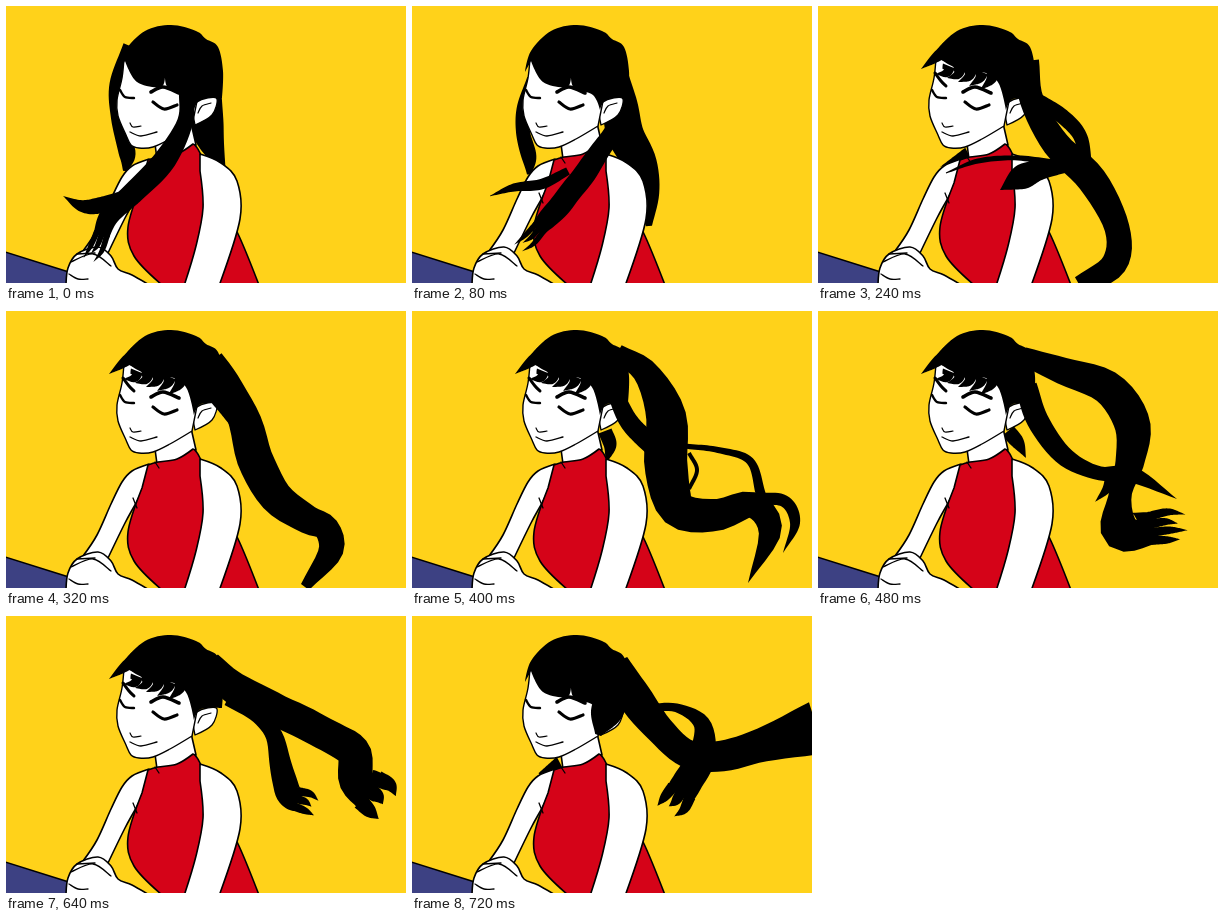
An HTML page with a canvas for the animation above (0.8 s loop, 400 by 277 pixels).

```html
<!DOCTYPE html>
<html lang="en">
<head>
<meta charset="utf-8">
<title>Hair in the wind</title>
<style>
html, body { margin: 0; width: 100%; height: 100%; overflow: hidden; background: #ffd21a; }
canvas { display: block; width: 400px; height: 277px; }
</style>
</head>
<body>
<canvas id="stage" width="400" height="277"></canvas>
<script>
const ctx = document.getElementById('stage').getContext('2d');
const YELLOW = '#ffd21a', RED = '#d50318', BLUE = '#3d4183', BLACK = '#000', WHITE = '#fff';
const STEP = 80, SAMPLES = 36;

const lerp = (a, b, t) => a + (b - a) * t;

// Catmull-Rom value at t (0..1) through a list of numbers.
function spline(values, t) {
  const last = values.length - 1, s = t * last, i = Math.min(last - 1, Math.floor(s)), f = s - i;
  const b = values[i], c = values[i + 1];
  const a = values[i - 1] ?? 2 * b - c, d = values[i + 2] ?? 2 * c - b;
  return b + f / 2 * (c - a + f * (2 * a - 5 * b + 4 * c - d + f * (3 * (b - c) + d - a)));
}

// A lock of hair: a spine with a changing width, its end split into wisps.
function lock(spine, widths, wisps = 0, length = 0) {
  const xs = spine.filter((_, i) => i % 2 === 0), ys = spine.filter((_, i) => i % 2);
  const points = Array.from({ length: SAMPLES + 1 }, (_, i) => {
    const t = i / SAMPLES;
    return { x: spline(xs, t), y: spline(ys, t), w: Math.max(0, spline(widths, t)) };
  });
  return { points, wisps, length };
}

function mixLocks(from, to) {
  const count = Math.min(2, from.length, to.length);
  return from.slice(0, count).map((lockA, k) => ({
    ...lockA,
    points: lockA.points.map((p, i) => {
      const q = to[k].points[i];
      return { x: lerp(p.x, q.x, 0.5), y: lerp(p.y, q.y, 0.5), w: lerp(p.w, q.w, 0.5) };
    })
  }));
}
const between = (a, b, down) => ({ down, back: mixLocks(a.back, b.back), front: mixLocks(a.front, b.front) });

function heading(points, i) {
  const a = points[Math.max(0, i - 1)], b = points[Math.min(points.length - 1, i + 1)];
  const size = Math.hypot(b.x - a.x, b.y - a.y) || 1;
  return { x: (b.x - a.x) / size, y: (b.y - a.y) / size };
}

function drawLock({ points, wisps, length }) {
  const side = sign => points.map((p, i) => {
    const d = heading(points, i), r = sign * p.w / 2;
    return [p.x - d.y * r, p.y + d.x * r];
  });
  ctx.beginPath();
  [...side(1), ...side(-1).reverse()].forEach(p => ctx.lineTo(...p));
  ctx.fillStyle = BLACK;
  ctx.fill();

  const end = points[SAMPLES], d = heading(points, SAMPLES);
  for (let i = 0; i < wisps; i++) {
    const u = (i + 0.5) / wisps - 0.5, w = end.w / wisps, reach = length * (1 - 0.25 * (i % 2));
    const at = (along, across) => [end.x + d.x * along - d.y * across, end.y + d.y * along + d.x * across];
    drawLock(lock([...at(-3, end.w * u), ...at(reach / 2, end.w * u * 1.15), ...at(reach, end.w * u + 3)], [w * 1.15, w * 0.9, 0]));
  }
}

// Smooth path through "x,y" points; a trailing * makes a sharp corner.
function curve(text, closed) {
  const pts = text.split(' ').map(t => {
    const [x, y] = t.replace('*', '').split(',').map(Number);
    return { x, y, k: t.endsWith('*') ? 0 : 1 / 6 };
  });
  const n = pts.length, path = new Path2D();
  const at = i => closed ? pts[(i + n) % n] : pts[Math.max(0, Math.min(n - 1, i))];
  const handle = (i, sign) => {
    const p = at(i), a = at(i - 1), b = at(i + 1);
    return [p.x + (b.x - a.x) * p.k * sign, p.y + (b.y - a.y) * p.k * sign];
  };
  path.moveTo(pts[0].x, pts[0].y);
  for (let i = 0; i < (closed ? n : n - 1); i++) {
    path.bezierCurveTo(...handle(i, 1), ...handle(i + 1, -1), at(i + 1).x, at(i + 1).y);
  }
  return path;
}
const shape = text => curve(text, true);
const line = text => curve(text, false);

function paint(path, color, width = 1.6) {
  ctx.fillStyle = color;
  ctx.fill(path);
  ink(path, width);
}
function ink(path, width) {
  ctx.lineWidth = width;
  if (width) ctx.stroke(path);
}

const table = shape('-4,245* 66,267* 62,281* -4,281*');
const body = [
  [shape('149,138* 151,153* 170,151* 190,139* 185,117* 165,125*'), WHITE],
  [shape('143,153* 126,160 116,171 105,193 91,224 77,245* 102,247* 119,212 131,190 146,160*'), WHITE],
  [shape('142,154* 152,151 171,148 187,138* 194,147 212,190 233,230 253,279* 156,279* 128,250 122,221 136,177*'), RED],
  [shape('194,148* 215,157 231,175 234,213 213,280* 178,280* 190,240 197,202 194,165*'), WHITE],
  [shape('60,280* 62,262 71,248 92,241 105,250 112,263 126,269 145,280*'), WHITE]
];
const creases = ['149,151 153,157', '65,256 87,248 105,260', '71,248 89,247', '63,268 72,273 82,273', '127,187 131,197'].map(line);

const face = shape('118,52* 116,72 111,94 112,110 120,129 125,139 133,142 147,141 164,133 186,120* 192,90* 175,50*');
const ear = shape('186,104* 191,96 201,92 211,93 206,109 189,119*');
const features = [
  ['192,107 196,100 205,97', 1.2], ['124,117 127,121 135,120', 1.2], ['124,126 135,130 151,126', 1.3],
  ['114,84 119,91 128,92', 2.4], ['147,96 158,103 171,99', 3.2], ['145,86 157,81 173,87', 3.6]
].map(([text, width]) => [line(text), width]);
const leftBrow = line('117,67 123,75 128,80');

const CROWN = '119,45 139,25 165,19 190,25 200,33 212,41 217,65 216,92* 195,93 188,104* ';
const bangsDown = shape(CROWN + '181,89 162,82 159,68* 155,81 131,76 119,55* 113,66*');
const bangsLifted = shape(CROWN + '181,78 168,67 145,65 125,55*');
const fringe = [lock([130, 42, 116, 53, 103, 63], [14, 9, 0])];
for (let i = 0; i < 5; i++) {
  const x = 131 + 11 * i, y = 60 + 2 * i;
  fringe.push(lock([x, y, x - 3, y + 7, x - 13, y + 8 + 2 * i], [13, 9, 0]));
}

const still = {
  down: true,
  back: [
    lock([200, 80, 202, 125, 219, 169], [30, 32, 2]),
    lock([124, 40, 109, 78, 110, 112, 121, 146, 119, 165], [14, 11, 10, 17, 4])
  ],
  front: [
    lock([180, 84, 179, 116, 158, 155, 128, 186, 104, 209, 95, 230], [14, 16, 23, 22, 20, 16], 3, 27),
    lock([116, 190, 95, 199, 76, 200, 57, 190], [10, 16, 12, 0])
  ]
};
const stirring = {
  back: [
    lock([206, 60, 216, 100, 226, 140, 252, 180, 258, 225, 255, 271], [24, 38, 40, 38, 35, 10]),
    lock([116, 105, 112, 140, 115, 172], [6, 18, 4])
  ],
  front: [
    lock([228, 160, 202, 162, 186, 185, 176, 208, 157, 217], [24, 22, 22, 23, 15], 2, 18),
    lock([196, 140, 165, 157, 128, 163, 99, 190], [6, 5, 4, 1])
  ]
};
const swinging = {
  back: [lock([150, 147, 122, 161], [12, 0])],
  front: [
    lock([208, 55, 214, 95, 238, 138, 274, 174, 299, 222, 296, 258, 262, 280], [26, 24, 28, 30, 25, 26, 20]),
    lock([218, 92, 244, 110, 262, 130, 268, 158], [12, 15, 14, 12]),
    lock([246, 160, 222, 164, 202, 172, 182, 184], [14, 20, 24, 0]),
    lock([240, 158, 200, 152, 160, 155, 128, 167], [8, 5, 5, 1])
  ]
};
const lifting = {
  back: [lock([193, 120, 198, 134, 195, 149], [14, 13, 3])],
  front: [
    lock([205, 42, 234, 62, 254, 105, 254, 155, 266, 198, 304, 204, 340, 194, 358, 220, 336, 272], [18, 26, 40, 43, 37, 32, 26, 23, 0]),
    lock([203, 82, 218, 112, 246, 140], [16, 19, 20]),
    lock([272, 135, 306, 139, 338, 150, 349, 184], [5, 6, 8, 10]),
    lock([277, 142, 285, 159, 277, 178], [4, 4, 4]),
    lock([340, 188, 372, 190, 383, 212, 371, 242], [12, 12, 10, 0])
  ]
};
const rising = {
  back: [lock([190, 120, 200, 132, 208, 147], [15, 13, 0])],
  front: [
    lock([205, 45, 245, 60, 290, 77, 314, 112, 312, 150, 302, 185, 303, 219, 335, 217], [18, 27, 34, 36, 29, 23, 40, 32], 4, 34),
    lock([208, 75, 220, 110, 246, 145, 280, 162, 315, 164, 359, 188], [22, 22, 19, 14, 16, 0]),
    lock([294, 158, 290, 176, 277, 191], [12, 10, 0])
  ]
};
const arching = {
  back: [lock([190, 122, 196, 140, 204, 156], [10, 14, 0]), lock([148, 147, 127, 157], [14, 2])],
  front: [
    lock([203, 44, 236, 68, 294, 80, 342, 89, 369, 106, 376, 137, 344, 200, 326, 240], [18, 31, 35, 37, 36, 37, 36, 32], 3, 22),
    lock([206, 76, 236, 104, 248, 130, 255, 165, 275, 195, 300, 196, 316, 189], [14, 20, 19, 20, 22, 20, 16], 3, 20)
  ]
};
const streaming = {
  down: true,
  back: [lock([148, 147, 127, 158], [14, 2])],
  front: [
    lock([206, 45, 222, 80, 248, 114, 276, 138, 310, 140, 350, 129, 405, 112], [20, 34, 29, 28, 31, 34, 54]),
    lock([236, 92, 265, 92, 290, 108, 290, 140, 276, 165, 268, 178], [8, 9, 17, 27, 30, 30], 3, 22),
    lock([202, 78, 193, 100, 186, 119], [34, 30, 6])
  ]
};
const poses = [
  still, between(still, stirring, true), stirring, swinging, between(swinging, lifting),
  lifting, rising, arching, between(arching, streaming), streaming
];

function draw({ down, back, front }) {
  ctx.fillStyle = YELLOW;
  ctx.fillRect(0, 0, 400, 277);
  ctx.strokeStyle = BLACK;
  ctx.lineCap = ctx.lineJoin = 'round';
  paint(table, BLUE);
  back.forEach(drawLock);

  body.forEach(([path, color]) => paint(path, color));
  creases.forEach(path => ink(path, 1.3));
  paint(ear, WHITE, 1.3);
  paint(face, WHITE, 1.4);
  features.forEach(([path, width]) => ink(path, width));
  if (!down) ink(leftBrow, 3);

  front.forEach(drawLock);
  paint(down ? bangsDown : bangsLifted, BLACK, 0);
  if (!down) fringe.forEach(drawLock);
}

function tick() {
  draw(poses[Math.floor(performance.now() / STEP) % poses.length]);
  requestAnimationFrame(tick);
}
tick();
</script>
</body>
</html>
```
